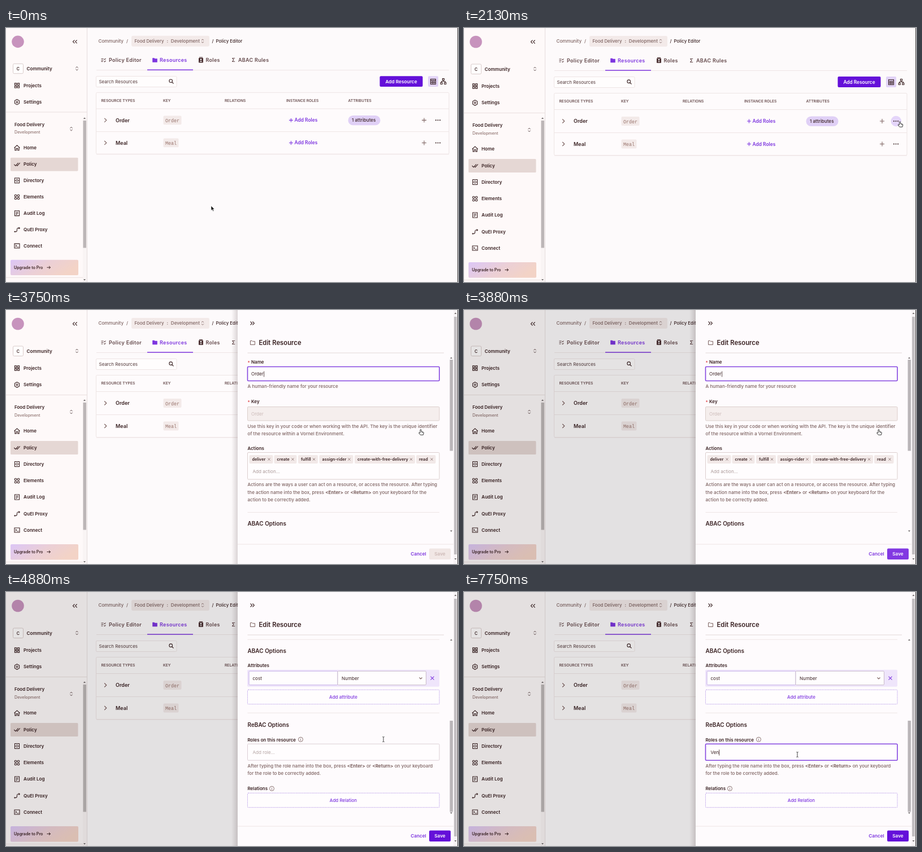
An HTML page that plays this animation: 800x450 px, repeating every 8000 ms.

```html
<!DOCTYPE html>
<html lang="en">
<head>
<meta charset="utf-8">
<title>Edit resource</title>
<style>
html, body { margin: 0; height: 100%; overflow: hidden; background: #fdfafb }
svg { display: block; width: 800px; height: 450px; font-family: Inter, sans-serif }
text { white-space: pre }
</style>
</head>
<body>
<svg id="stage" viewBox="0 0 800 450"></svg>
<script>
const INK = '#3a2223', SOFT = '#7d6260', VIOLET = '#7d35df', DEEP = '#6410d9', LINE = '#eee5e5', CHIP = '#f3eae9';

// y is the middle of the capitals
const text = (x, y, s, size = 8, fill = INK, weight = 600, more = '') =>
  `<text x="${x}" y="${y + size * .365}" font-size="${size}" fill="${fill}" font-weight="${weight}" ${more}>${s}</text>`;
const rect = (x, y, w, h, fill, stroke = 'none', r = 1.5, more = '') =>
  `<rect x="${x}" y="${y}" width="${w}" height="${h}" rx="${r}" fill="${fill}" stroke="${stroke}" ${more}/>`;
const line = (x1, y1, x2, y2, stroke = LINE, more = '') =>
  `<path d="M${x1} ${y1}L${x2} ${y2}" stroke="${stroke}" ${more}/>`;
const icon = (x, y, d, stroke = INK, fill = 'none', width = 1.1) =>
  `<path transform="translate(${x} ${y})" d="${d}" stroke="${stroke}" fill="${fill}" stroke-width="${width}"/>`;
const group = (id, body, more = '') => `<g id="${id}" ${more}>${body}</g>`;
const middle = 'text-anchor="middle"';

const ring = (x, y, r) => `M${x - r} ${y}a${r} ${r} 0 1 0 ${2 * r} 0a${r} ${r} 0 1 0 ${-2 * r} 0`;
const four = shape => [[-2.5, -2.5], [2.5, -2.5], [-2.5, 2.5], [2.5, 2.5]].map(([x, y]) => shape(x, y)).join('');
const PLUS = 'M-4 0H4M0-4V4', CROSS = 'M-2-2L2 2M-2 2L2-2', ARROW = 'M-3 0H3M.5-2.5L3 0L.5 2.5';
const UPDOWN = 'M-2-1.2L0-3.2L2-1.2M-2 1.2L0 3.2L2 1.2';
const FOLDER = 'M-4-3.5H-1L0-2.4H4V3.5H-4Z';
const INFO = ring(0, 0, 4) + 'M0-.5V2.2M0-2.3V-1.5';
const MENU = [
  [103, 'Projects', four((x, y) => `M${x - 1.6} ${y - 1.6}h3.2v3.2h-3.2z`)],
  [132.5, 'Settings', 'M0-4.8L4.1-2.4V2.4L0 4.8L-4.1 2.4V-2.4Z' + ring(0, 0, 1.5)],
  [214.5, 'Home', 'M-5 0L0-4.6L5 0M-3.6-1V4.4H-1.2V1H1.2V4.4H3.6V-1'],
  [244, 'Policy', 'M-5.2 0L-2.6 2.6L2.2-2.6M-.6 1.6L.4 2.6L5.2-2.6'],
  [273, 'Directory', 'M-4-4.5H4V4.5H-4ZM-4 0H4M-1.2-2.2H1.2M-1.2 2.2H1.2'],
  [302.5, 'Elements', four((x, y) => ring(x, y, 1.8))],
  [331.5, 'Audit Log', 'M-4-4.5H4V4.5H-4ZM-2-2H2M-2 0H2M-2 2H.5'],
  [361, 'QuEl Proxy', 'M-4.5 3.5H-2Q0 3.5 0 0T2.5-3H4.5M3-4.6L4.8-3L3-1.4' + ring(-4, 3.5, .6)],
  [390, 'Connect', 'M-4.5-4H4.5V4H-4.5ZM-2.5-1.7L-.8 0L-2.5 1.7M.3 2H2.7'],
];

const sidebar = rect(0, 0, 143.5, 456, '#fef9f9', 'none', 0) + line(143.5, 0, 143.5, 456, '#e6dddd')
  + '<circle cx="21" cy="24.5" r="10.8" fill="#c793bd"/>'
  + icon(122, 24.5, 'M-.6-3L-3.6 0L-.6 3M3.6-3L.6 0L3.6 3')
  + rect(12.5, 64, 18, 17.5, '#fffdfd', '#d9cccb', 2) + text(21.5, 73, 'C', 7.2, INK, 600, middle)
  + text(36.5, 73, 'Community', 8.1) + icon(125.5, 72.5, UPDOWN, INK, 'none', .9)
  + line(0, 150.5, 143, 150.5, '#e9dfde') + line(0, 446.5, 136, 446.5, '#e9dfde')
  + text(15, 172.5, 'Food Delivery', 8) + text(15, 186, 'Development', 7.2, '#8f7370', 500)
  + icon(115.5, 180.5, UPDOWN, INK, 'none', .9)
  + rect(8, 232, 119.5, 24, '#e5d7d4')
  + MENU.map(([y, name, d]) => icon(19.5, y, d) + text(31, y, name, 8.1)).join('')
  + rect(8, 415, 120, 27.5, 'url(#upgrade)', 'none', 2)
  + text(14, 428.5, 'Upgrade to Pro', 7.1) + icon(75.5, 428.5, ARROW, INK, 'none', 1);

const row = (y, name) => icon(176, y, 'M-1.8-3.5L1.8 0L-1.8 3.5', SOFT, 'none', 1.2) + text(194, y, name, 9)
  + rect(278.5, y - 8, name.length * 5 + 7, 16, CHIP, 'none', 2)
  + text(282, y + .6, name, 8.4, '#98736c', 400, 'font-family="Liberation Mono, monospace"')
  + icon(504.5, y, 'M-3.5 0H3.5M0-3.5V3.5', VIOLET) + text(510.5, y, 'Add Roles', 8.4, VIOLET)
  + icon(740, y, PLUS, SOFT)
  + [-3.6, 0, 3.6].map(d => `<circle cx="${764.5 + d}" cy="${y}" r="1.05" fill="${INK}"/>`).join('')
  + line(160, y + 20.5, 784, y + 20.5);
const tab = (x, name, fill = '#63484a') => text(x, 57.5, name, 9, fill, 600, 'letter-spacing=".3"');

const main = text(163.5, 23.5, 'Community', 8.1, SOFT, 500) + text(213, 23.5, '/', 8.1, SOFT, 500)
  + rect(222, 14, 138, 19, CHIP, 'none', 3) + text(227.5, 23.5, 'Food Delivery', 7.9, SOFT, 500)
  + text(284.5, 23, ':', 8, SOFT) + text(291.8, 23.5, 'Development', 8.1, SOFT, 500)
  + icon(348, 23.3, UPDOWN, SOFT, 'none', .9)
  + text(364.5, 23.5, '/', 8.1, INK, 500) + text(371.5, 23.5, 'Policy Editor', 7.9, INK, 500)
  + icon(172.5, 57.5, 'M-4-2.5H0M-4 0H0M-4 2.5H-1M1-2L2.2-1L4-3M1 2L2.2 3L4 1', '#63484a') + tab(182, 'Policy Editor')
  + icon(263.5, 57.5, FOLDER, VIOLET, VIOLET, .6) + tab(272, 'Resources', VIOLET)
  + rect(341, 53.5, 8, 8.5, '#4b3032', 'none', 1) + line(342, 52.5, 348, 52.5, '#4b3032')
  + '<circle cx="345" cy="56.3" r="1.3" fill="#fff"/><path d="M342.7 60.3q2.3-3 4.6 0z" fill="#fff"/>'
  + tab(353.5, 'Roles') + tab(399.5, 'Σ') + tab(411, 'ABAC Rules')
  + line(160, 75.5, 784, 75.5) + line(250, 75, 331, 75, VIOLET, 'stroke-width="1.5"')
  + rect(159.5, 86.5, 142.5, 19, '#fffdfd', LINE) + text(164.5, 96, 'Search Resources', 8, '#52393a', 400)
  + icon(292.5, 95.5, ring(-.8, -.8, 2.8) + 'M1.3 1.3L4 4')
  + rect(661.5, 86, 76, 19, DEEP, 'none', 2) + text(699.5, 96, 'Add Resource', 8.3, '#fff', 600, middle)
  + rect(747, 86, 18, 19, '#e2d3f7', 'none', 2)
  + icon(756, 96, 'M-4.5-4.5H4.5V4.5H-4.5ZM-4.5-1.7H4.5M-4.5 1.4H4.5M-1.5-1.7V4.5M1.5-1.7V4.5')
  + icon(774, 95.5, 'M-1.5-5H1.5V-2H-1.5ZM-4.8 2H-1.8V5H-4.8ZM1.8 2H4.8V5H1.8ZM0-2V0M-3.3 2V0H3.3V2')
  + rect(159.5, 115.5, 624.5, 110, '#fefbfc', LINE, 2) + line(160, 144.5, 784, 144.5)
  + [[168.5, 'RESOURCE TYPES'], [278, 'KEY'], [387, 'RELATIONS'], [496, 'INSTANCE ROLES'], [605.5, 'ATTRIBUTES']]
    .map(([x, s]) => text(x, 130, s, 6.7, '#6b5051')).join('')
  + '<circle id="hover" cx="764.8" cy="165" r="9.3" fill="#e4d5fa"/>'
  + row(165, 'Order') + row(205.5, 'Meal')
  + rect(605.5, 156.5, 57, 17.5, '#e0d0f6', 'none', 8.7) + text(612, 165, '1 attributes', 8.1, INK, 500);

// Scrolling part of the drawer
const label = (y, s) => text(427.5, y, s, 8);
const required = (y, s) => text(427.5, y + 1, '*', 8, '#e2484d') + text(434, y, s, 8);
const hint = (y, s) => text(427.5, y, s, 8.1, SOFT, 500);
const field = (y, h, stroke, fill = '#fffdfe', more = '') => rect(427.5, y, 339.5, h, fill, stroke, 1.5, more);
const dashed = (y, s) => field(y, 25.5, '#a583e4', '#fffdfe', 'stroke-dasharray="1.6 1.2" stroke-width=".8"')
  + text(597, y + 13, s, 8, VIOLET, 500, middle);
const KEYS = '<tspan font-weight="700">&lt;Enter&gt;</tspan> or <tspan font-weight="700">&lt;Return&gt;</tspan> on your keyboard';
const CHIPS = [[430.5, 42, 'deliver'], [474.5, 40, 'create'], [517, 35, 'fulfill'], [554.5, 60, 'assign-rider'],
  [617, 107, 'create-with-free-delivery'], [726, 34.5, 'read']];

const form = required(92, 'Name') + field(100.5, 25, '#8445e0', '#fffdfe', 'stroke-width="1.6"')
  + text(434, 113.5, 'Order', 8.1, INK, 400) + rect(456.3, 108.5, .8, 10, INK, 'none', 0)
  + hint(135, 'A human-friendly name for your resource')
  + required(162.5, 'Key') + field(171.5, 24.5, '#dccfcc', '#f5eeed') + text(434, 184, 'Order', 8.1, '#cdbcba', 400)
  + hint(206, 'Use this key in your code or when working with the API. The key is the unique identifier')
  + hint(219, 'of the resource within a Vornel Environment.')
  + label(245.5, 'Actions') + field(252.5, 47.5, '#dccfce')
  + CHIPS.map(([x, w, s]) => rect(x, 257, w, 15, '#f2e9e8', 'none', 2) + text(x + 5, 264.5, s, 7.25)
    + icon(x + w - 7, 264.5, CROSS, SOFT, 'none', .9)).join('')
  + text(436.5, 286, 'Add action...', 8.1, '#ab9a99', 400)
  + hint(309.5, 'Actions are the ways a user can act on a resource, or access the resource. After typing')
  + hint(323, 'the action name into the box, press ' + KEYS + ' for the')
  + hint(336.5, 'action to be correctly added.')
  + line(427.5, 358.5, 767, 358.5) + text(427.5, 378.5, 'ABAC Options', 10)
  + group('', label(130.5, 'Attributes') + rect(427, 138, 340, 30, '#efe5fb', 'none', 2)
    + rect(430, 140.5, 157, 24.5, '#fffdfe', '#c5b0e6') + rect(587, 140.5, 156.5, 24.5, '#fffdfe', '#c9bcca')
    + text(436.5, 153, 'cost', 8.1, INK, 400) + text(594, 153, 'Number', 8.1, INK, 400)
    + icon(734, 153, 'M-2.5-1.2L0 1.3L2.5-1.2', SOFT) + icon(754.5, 153, 'M-3-3L3 3M-3 3L3-3', VIOLET)
    + dashed(173.5, 'Add attribute') + line(427.5, 214.5, 767, 214.5)
    + text(427.5, 235.5, 'ReBAC Options', 10)
    + label(262, 'Roles on this resource') + icon(521.5, 261.5, INFO, SOFT, 'none', .9)
    + field(269.5, 29, '#dccfd6', '#fffdfe', 'id="roleBox"') + text(436.5, 284.5, 'Add role...', 8.1, '#b5a5a4', 400, 'id="role"')
    + rect(0, 279.5, .8, 10.5, INK, 'none', 0, 'id="caret"')
    + hint(308.5, 'After typing the role name into the box, press ' + KEYS)
    + hint(321.5, 'for the role to be correctly added.')
    + label(348.5, 'Relations') + icon(470.5, 348.5, INFO, SOFT, 'none', .9)
    + dashed(356.5, 'Add Relation'), 'transform="translate(0 274)"');

const tip = (x, y, dir) => `<path d="M${x - 2} ${y + dir}h4l-2 ${-2.4 * dir}z" fill="#6b6566"/>`;
const drawer = rect(399, 0, 11, 450, 'url(#shade)', 'none', 0) + rect(410, 0, 390, 450, '#fefbfd', 'none', 0)
  + icon(436, 23.5, 'M-3.4-3L-.4 0L-3.4 3M.4-3L3.4 0L.4 3')
  + icon(436.5, 58, FOLDER, SOFT, 'none', 1) + text(447.5, 58, 'Edit Resource', 11.3)
  + line(427.5, 76, 775, 76, '#e2d8d8')
  + `<g clip-path="url(#pane)">${group('scroll', form)}</g>`
  + tip(788, 85, 1) + tip(788, 391.5, -1) + rect(785.5, 88, 5.5, 161.5, '#bab6b9', 'none', 0, 'id="thumb"')
  + line(410, 415, 792, 415) + text(730, 432.5, 'Cancel', 8.2, VIOLET, 600, middle)
  + rect(749, 422.5, 38, 19.5, DEEP, 'none', 2, 'id="save"') + text(768, 432.5, 'Save', 8.2, '#fff', 600, middle + ' id="saveText"')
  + rect(792, 0, 7, 450, '#f8f4f6', 'none', 0) + rect(793, 12, 5, 421, '#c3bfc2', 'none', 0)
  + tip(795.5, 6, 1) + tip(795.5, 441, -1);

const cursors = group('arrow', '<path d="M0 0V8.4L2 6.6L3.4 9.7L4.8 9L3.5 6.1H6Z" fill="#111" stroke="#fff" stroke-width=".6"/>')
  + group('hand', '<path d="M-1 .8Q0-.5 1 .8V4L4.5 4.8Q5.5 5.2 5.2 6.6L4.4 9.8H-.6L-3.4 6.4Q-3.4 4.9-1 6.2Z" fill="#fff" stroke="#222" stroke-width=".9"/><path d="M2.3 4.4V6M3.8 4.8V6.2" stroke="#222" stroke-width=".6"/>')
  + group('beam', '<path d="M-1.7-4.5Q0-4.5 0-3.5Q0-4.5 1.7-4.5M0-3.5V3.5M-1.7 4.5Q0 4.5 0 3.5Q0 4.5 1.7 4.5" fill="none" stroke="#333" stroke-width=".9"/>');

document.getElementById('stage').innerHTML = `<defs>
  <linearGradient id="upgrade" y2=".35"><stop stop-color="#dcc6f6"/><stop offset=".55" stop-color="#ebcfd6"/><stop offset="1" stop-color="#f3d3c6"/></linearGradient>
  <linearGradient id="shade"><stop stop-color="#503c40" stop-opacity="0"/><stop offset="1" stop-color="#503c40" stop-opacity=".2"/></linearGradient>
  <clipPath id="pane"><rect x="410" y="82" width="375" height="314"/></clipPath></defs>`
  + rect(0, 0, 800, 450, '#fdfafb', 'none', 0) + group('page', sidebar + main)
  + rect(136, 158, 7, 292, '#f9f4f4', 'none', 0) + rect(136.5, 164, 5.5, 225.5, '#bcb6b7', 'none', 0)
  + tip(139, 160, 1) + tip(139, 446, -1)
  + rect(0, 0, 800, 450, '#000', 'none', 0, 'id="dim"') + group('drawer', drawer)
  + rect(799, 0, 1, 450, '#4a4446', 'none', 0) + group('cursor', cursors);

const $ = id => document.getElementById(id);
const set = (id, attrs) => { for (const k in attrs) $(id).setAttribute(k, attrs[k]); };
const show = (id, on) => set(id, { visibility: on ? 'visible' : 'hidden' });
const span = (t, a, b) => Math.min(1, Math.max(0, (t - a) / (b - a)));
const ease = p => p * p * (3 - 2 * p);

// start, end, x, y
const MOVES = [[875, 2000, 771.5, 165.5], [2625, 3250, 734, 211.5], [4125, 4750, 668, 261],
  [5625, 6125, 592, 287], [6875, 7250, 590, 288]];

function draw(ms) {
  const t = Math.floor(ms % 8000 / 125) * 125;

  let x = 363, y = 315;
  for (const [a, b, toX, toY] of MOVES) {
    const p = ease(span(t, a, b));
    x += (toX - x) * p;
    y += (toY - y) * p;
  }
  set('cursor', { transform: `translate(${x} ${y})` });
  show('arrow', t < 1875 || t > 4125 && t < 4500);
  show('hand', t >= 1875 && t <= 4125);
  show('beam', t >= 4500);

  set('page', { transform: `scale(1 ${t < 125 ? .99 : 1})` });
  set('hover', { opacity: t < 2875 ? span(t, 1750, 2125) : 0 });
  set('dim', { opacity: .1 * span(t, 3750, 3875) });
  set('drawer', { transform: `translate(${390 * (1 - span(t, 3375, 3750)) ** 3} 0)` });
  show('drawer', t >= 3500);
  const ready = t >= 3875;
  set('save', { fill: !ready ? '#f1e7e5' : t < 4125 ? '#8239e2' : DEEP });
  set('saveText', { fill: ready ? '#fff' : '#cdb9b6' });

  const scrolled = ease(span(t, 4250, 4875));
  set('scroll', { transform: `translate(0 ${-274.3 * scrolled})` });
  set('thumb', { y: 88 + 140 * scrolled });

  const focused = t >= 6375, typed = 'Ven'.slice(0, Math.max(0, (t - 7000) / 250));
  set('roleBox', { stroke: focused ? '#8445e0' : t >= 6000 ? '#a081e2' : '#dccfd6', 'stroke-width': focused ? 1.6 : 1 });
  $('role').textContent = typed || 'Add role...';
  set('role', { fill: typed ? INK : '#b5a5a4' });
  set('caret', { x: 436.7 + (typed ? $('role').getComputedTextLength() : 0) });
  set('caret', { opacity: focused && (t < 7000 || typed) ? 1 : 0 });
}

const start = performance.now();
(function tick() {
  draw(performance.now() - start);
  requestAnimationFrame(tick);
})();
</script>
</body>
</html>
```
